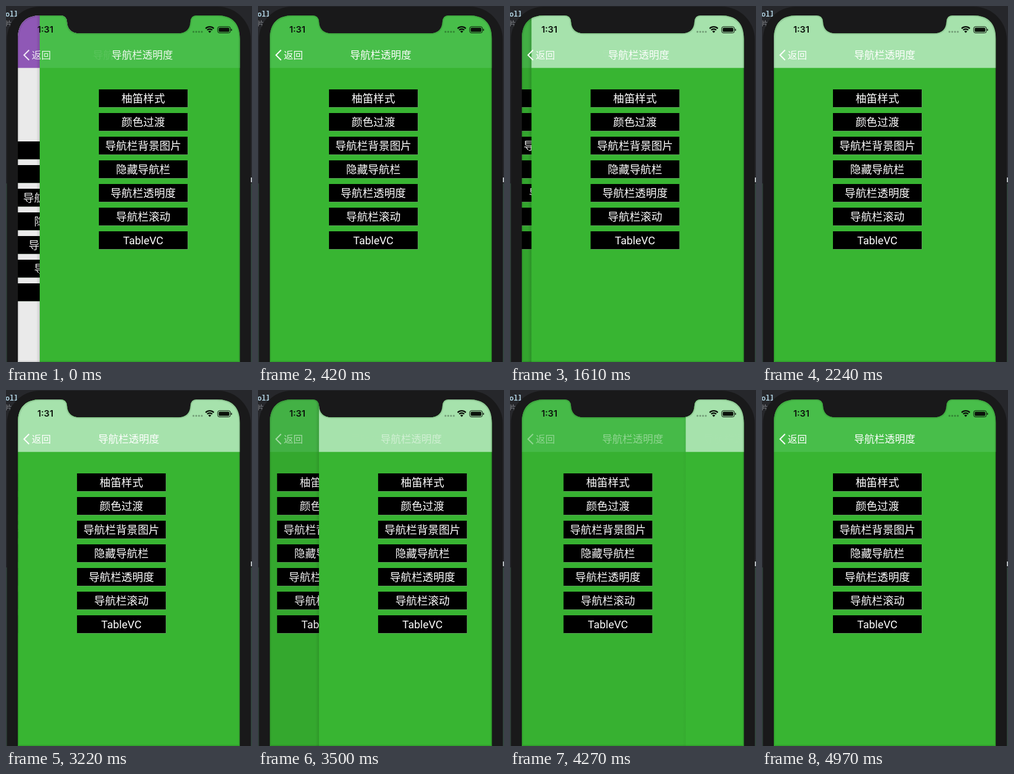
Animation of 416x602 px, one loop 5040 ms. Source, as an HTML page with a canvas:

```html
<!DOCTYPE html>
<html lang="zh-CN">
<head>
<meta charset="utf-8">
<style>
html, body { margin: 0; height: 100%; overflow: hidden; background: #1a1a1b; }
canvas { display: block; width: 416px; height: 602px; }
</style>
</head>
<body>
<canvas width="416" height="602"></canvas>
<script>
const ctx = document.querySelector('canvas').getContext('2d');
const LOOP = 5040, LEFT = 20, WIDTH = 375.5, BAR_TOP = 16, BAR_END = 104.7;
const CJK = '"Noto Sans CJK SC", "Noto Sans CJK", sans-serif';
const LABELS = ['柚笛样式', '颜色过渡', '导航栏背景图片', '隐藏导航栏', '导航栏透明度', '导航栏滚动', 'TableVC'];

const purple = { body: '#ffffff', bar: '#9c60c6', title: '导航栏背景图片', top: 229 };
const green = { body: '#38b532', bar: '#48be4a', title: '导航栏透明度', top: 141 };
const pale = { ...green, bar: '#a6e2ac' };

const clamp = v => Math.min(1, Math.max(0, v));
const mix = (a, b, u) => a + (b - a) * u;

// Remaining share of a critically damped push after ms
function spring(ms) {
  const s = Math.max(0, ms) * Math.sqrt(1000 / 3) / 1000;
  return (1 + s) * Math.exp(-s);
}

// Finger drag, then release; result is the top page's offset in px
function drag(t) {
  if (t < 3710) return 162 * ((t - 3220) / 490) ** 1.2;
  if (t < 4270) return mix(162, 276.5, (t - 3710) / 560);
  return mix(276.5, WIDTH, 1 - (1 - clamp((t - 4270) / 280)) ** 2);
}

function text(str, x, y, font, color, align = 'center') {
  ctx.font = font;
  ctx.fillStyle = color;
  ctx.textAlign = align;
  ctx.fillText(str, x, y);
}

function rect(x, y, w, h, color) {
  ctx.fillStyle = color;
  ctx.fillRect(x, y, w, h);
}

function drawPage(page, dx) {
  const x = LEFT + dx;
  rect(x, 0, WIDTH, 602, page.body);
  rect(x, BAR_TOP, WIDTH, BAR_END - BAR_TOP, page.bar);
  LABELS.forEach((label, i) => {
    const y = page.top + i * 40;
    rect(x + 101, y + 1, 150, 30, 'rgba(120,140,120,.55)');
    rect(x + 100, y, 150, 30, '#000');
    text(label, x + 175, y + 21.8, '18.4px Roboto, ' + CJK, '#fff');
  });
}

function drawTitle(page, dx, alpha) {
  ctx.globalAlpha = alpha;
  text(page.title, 207.5 + dx, 89.4, '500 17.3px ' + CJK, '#fff');
  ctx.globalAlpha = 1;
}

function drawBack(alpha, clipped) {
  ctx.save();
  ctx.globalAlpha = alpha;
  text('返回', 43.5, 89.2, '16.2px ' + CJK, '#fff', 'left');
  if (clipped) {
    ctx.beginPath();
    ctx.rect(35.5, 60, 10, 45);
    ctx.clip();
  }
  ctx.strokeStyle = '#fff';
  ctx.lineWidth = 2;
  ctx.stroke(new Path2D('M39 74.5 L30.5 83 L39 91.5'));
  ctx.restore();
}

// p: 0 = top page in place, 1 = top page fully off to the right
function drawPages(under, top, p, fade, clipped) {
  const x = p * WIDTH, edge = LEFT + x;
  if (x > .05) {
    drawPage(under, -.3 * (WIDTH - x));
    rect(LEFT, 0, WIDTH, 602, `rgba(0,0,0,${.09 * (1 - p)})`);
    const shade = ctx.createLinearGradient(edge - 6, 0, edge, 0);
    shade.addColorStop(0, 'rgba(0,0,0,0)');
    shade.addColorStop(1, `rgba(0,0,0,${.14 * (1 - p)})`);
    rect(edge - 6, 0, 6, 602, shade);
  }
  drawPage(top, x);
  drawTitle(under, 0, p ** fade);
  drawTitle(top, x * .62, (1 - p) ** fade);
  drawBack(clamp(p ** fade + Math.max(0, 1 - 2.2 * p)), clipped);
}

const screen = new Path2D(`M20 602 V56 C20 29 33 16 59 16 H92 Q102 16 103 26
  Q104 46.3 124 46.3 H291 Q311 46.3 312 26 Q313 16 322 16 H356.5
  C382.5 16 395.5 29 395.5 56 V602 Z`);

function drawDesktop() {
  rect(0, 0, 416, 602, '#26272b');
  rect(0, 300, 416, 302, '#33443e');
  rect(414, 290, 2, 8, '#b5bcc0');
  text('oll', -1, 18, 'bold 12px "Noto Sans Mono", monospace', '#a9c9d8', 'left');
  text('片', -1, 34, '11px ' + CJK, '#8a8d92', 'left');
  ctx.fillStyle = '#19191a';
  ctx.beginPath();
  ctx.roundRect(1.5, 1, 412.5, 700, 56);
  ctx.fill();
}

function drawStatus() {
  text('1:31', 66.5, 45.3, '600 15px Inter, sans-serif', '#0b120b');
  ctx.fillStyle = 'rgba(0,0,0,.3)';
  for (let i = 0; i < 4; i++) {
    ctx.beginPath();
    ctx.arc(317 + i * 4.7, 43.7, 1.6, 0, 7);
    ctx.fill();
  }
  ctx.strokeStyle = ctx.fillStyle = '#0b120b';
  ctx.lineWidth = 2.3;
  for (const r of [6, 9.8]) {
    ctx.beginPath();
    ctx.arc(344.5, 45, r, -Math.PI * .75, -Math.PI * .25);
    ctx.stroke();
  }
  ctx.beginPath();
  ctx.moveTo(344.5, 45.5);
  ctx.arc(344.5, 45.5, 3.6, -Math.PI * .75, -Math.PI * .25);
  ctx.fill();
  ctx.lineWidth = 1;
  ctx.beginPath();
  ctx.roundRect(358, 35, 21.5, 10.5, 3);
  ctx.stroke();
  ctx.beginPath();
  ctx.roundRect(359.7, 36.7, 18, 7.1, 1.6);
  ctx.roundRect(380.7, 38.5, 1.4, 3.6, .7);
  ctx.fill();
}

function drawScene(t) {
  if (t < 560) drawPages(purple, green, spring(t + 213), 1);
  else if (t < 1330) drawPages(green, green, 0, 1);
  else if (t < 2100) drawPages(green, pale, spring(t - 1342), 1, t < 1400);
  else if (t < 3220) drawPages(green, pale, 0, 1);
  else if (t < 4550) drawPages(green, pale, drag(t) / WIDTH, 3);
  else drawPages(green, green, 0, 1);
}

function frame() {
  drawDesktop();
  ctx.save();
  ctx.clip(screen);
  drawScene(performance.now() % LOOP);
  // Soft dark rim where the glass meets the bezel
  ctx.strokeStyle = 'rgba(0,0,0,.1)';
  ctx.lineWidth = 4;
  ctx.stroke(screen);
  ctx.restore();
  drawStatus();
  requestAnimationFrame(frame);
}
frame();
</script>
</body>
</html>
```
